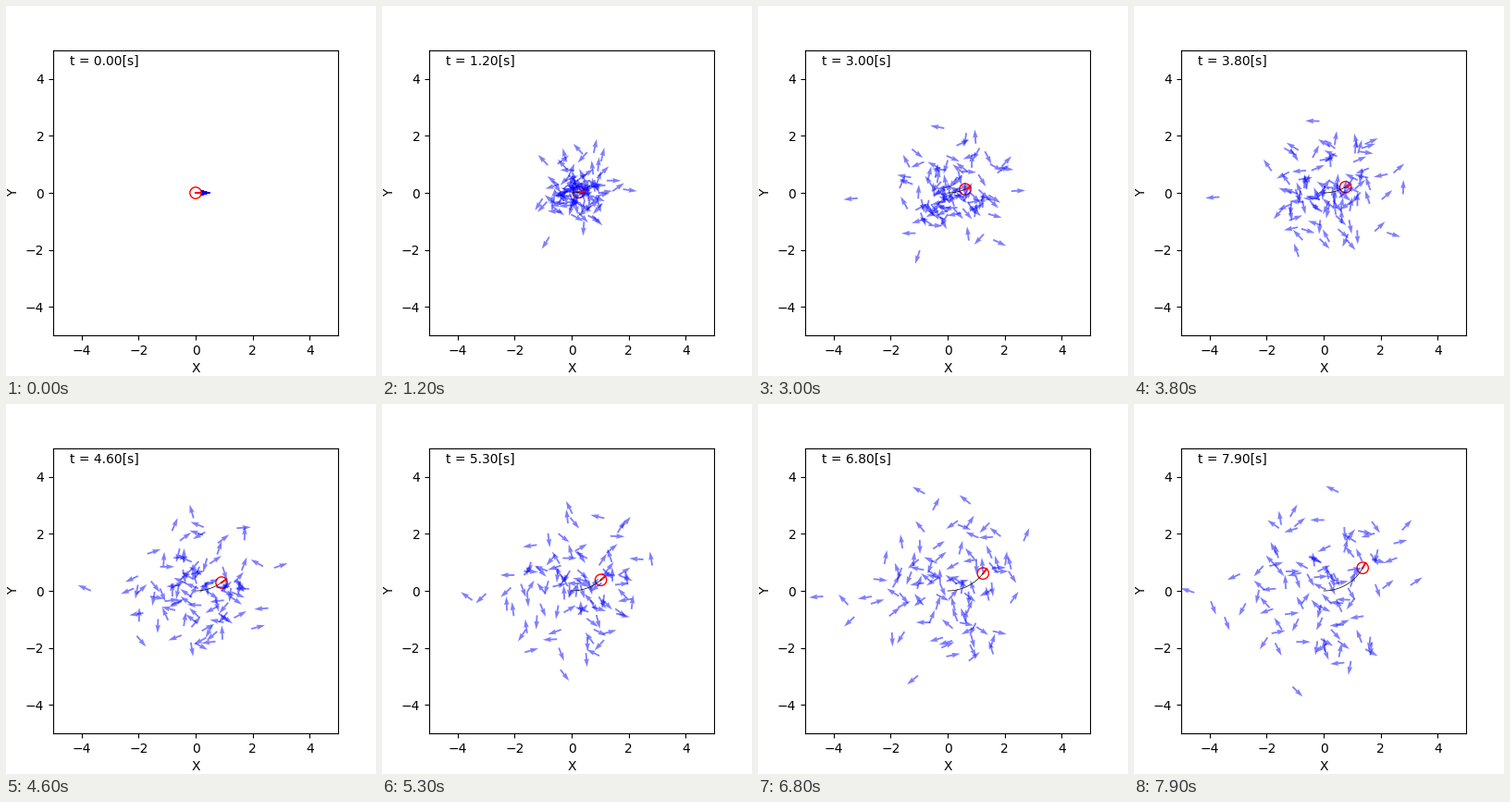
Animation, 400 px wide and 400 px high, one loop 8000 ms. Source, as a matplotlib script:

```python
import numpy as np
import matplotlib.pyplot as plt
from matplotlib.animation import FuncAnimation
from matplotlib.patches import Circle

STEPS, DT = 80, 0.1
COUNT = 100
SPEED, TURN = 0.211, 0.1344      # robot velocity and yaw rate
MOVE_STD, TURN_STD = 0.21, 0.6   # particle noise per step
RADIUS = 0.2


def robot_path():
    """Poses (x, y, heading) along a circular arc."""
    heading = TURN * DT * np.arange(STEPS)
    r = SPEED / TURN
    return r * np.sin(heading), r * (1 - np.cos(heading)), heading


def particle_paths(seed=12):
    """Noisy copies of the robot motion, all starting at the origin."""
    rng = np.random.default_rng(seed)
    pos = np.zeros((STEPS, COUNT, 2))
    ang = np.zeros((STEPS, COUNT))
    for k in range(1, STEPS):
        move = SPEED * DT + rng.normal(0, MOVE_STD, COUNT)
        turn = TURN * DT + rng.normal(0, TURN_STD, COUNT)
        mid = ang[k - 1] + turn / 2
        pos[k] = pos[k - 1] + move[:, None] * np.stack([np.cos(mid), np.sin(mid)], axis=1)
        ang[k] = ang[k - 1] + turn
    return pos, ang


rx, ry, heading = robot_path()
pos, ang = particle_paths()

fig = plt.figure(figsize=(4, 4), dpi=100)
ax = fig.add_subplot(111)
ax.set_aspect("equal")
ax.set_xlim(-5, 5)
ax.set_ylim(-5, 5)
ax.set_xlabel("X", fontsize=10)
ax.set_ylabel("Y", fontsize=10)

clock = ax.text(-4.4, 4.5, "", fontsize=10)
nose, = ax.plot([], [], color="red")
body = ax.add_patch(Circle((0, 0), RADIUS, fill=False, color="red"))
trail, = ax.plot([], [], linewidth=0.5, color="black")
arrows = ax.quiver(pos[0, :, 0], pos[0, :, 1], np.cos(ang[0]), np.sin(ang[0]),
                   angles="xy", scale_units="xy", scale=2, color="blue", alpha=0.5)


def update(k):
    x, y, a = rx[k], ry[k], heading[k]
    clock.set_text(f"t = {k * DT:.2f}[s]")
    nose.set_data([x, x + RADIUS * np.cos(a)], [y, y + RADIUS * np.sin(a)])
    body.center = (x, y)
    trail.set_data(rx[:k + 1], ry[:k + 1])
    arrows.set_offsets(pos[k])
    arrows.set_UVC(np.cos(ang[k]), np.sin(ang[k]))
    return clock, nose, body, trail, arrows


anim = FuncAnimation(fig, update, frames=STEPS, interval=100,
                     repeat=True, repeat_delay=0)
plt.show()
```
